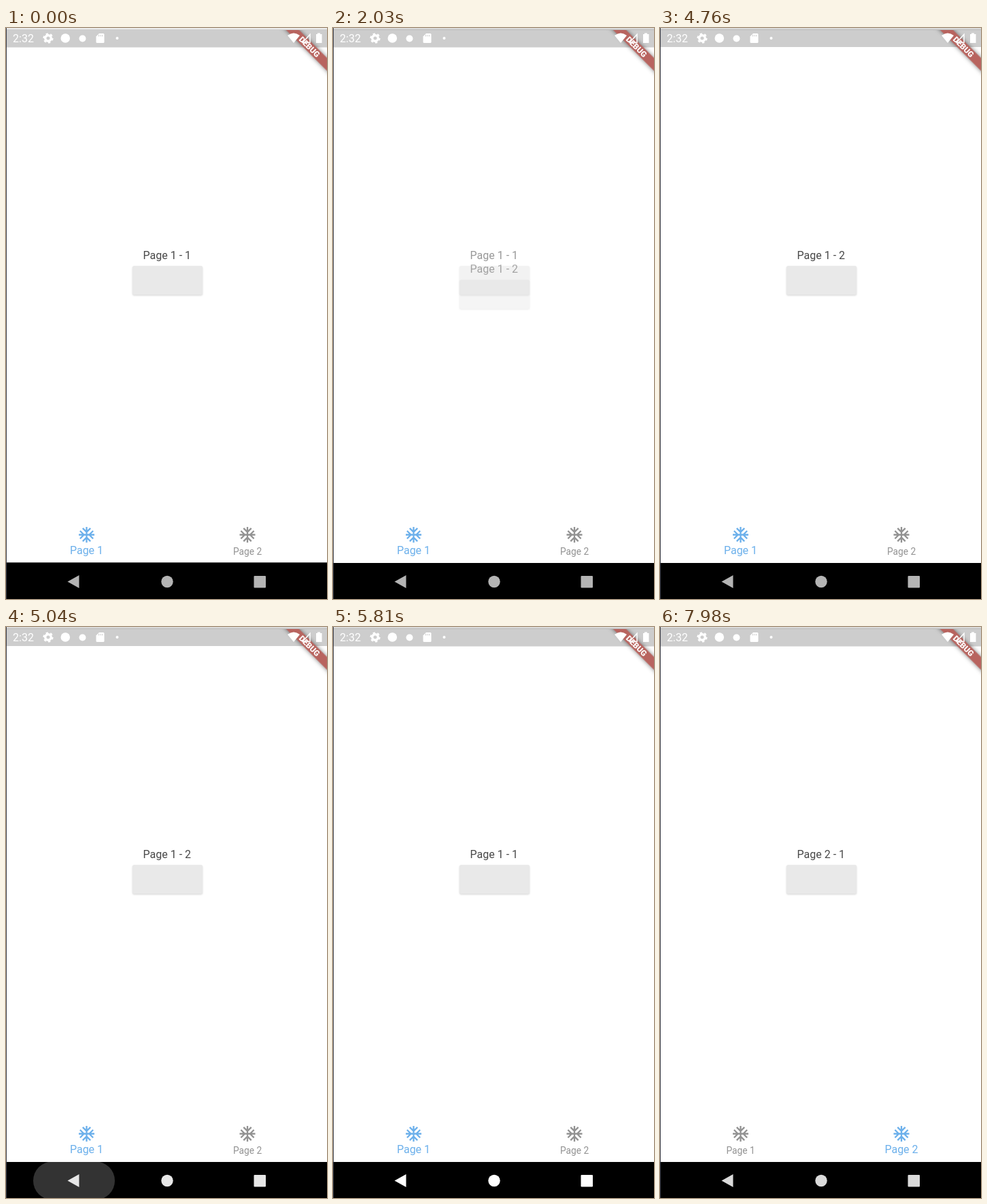
Recreate the animation shown at these times as an HTML page. Size 472 by 840 pixels, loop 8000 ms.

```html
<!DOCTYPE html>
<html>
<head>
<meta charset="utf-8">
<style>
  html, body { margin: 0; width: 100%; height: 100%; overflow: hidden; background: #fff; }
  svg { display: block; width: 472px; height: 840px; font-family: Roboto, Arial, sans-serif; }
  text { text-anchor: middle; }
  .button { fill: #e9e9e9; filter: drop-shadow(0 1.5px 1px rgba(0, 0, 0, .17)); }
  .title { font-size: 16px; fill: #484848; }
</style>
</head>
<body>
<svg viewBox="0 0 472 840">
  <defs>
    <clipPath id="body"><rect y="28" width="472" height="696"/></clipPath>
    <clipPath id="app"><rect y="3" width="472" height="784"/></clipPath>
    <clipPath id="nav"><rect x="1" y="787" width="471" height="53"/></clipPath>
    <g id="arm"><path d="M0-10V0M-4.95-8.35 0-3.4 4.95-8.35"/></g>
    <g id="flake" fill="none" stroke-width="2">
      <use href="#arm"/><use href="#arm" transform="rotate(90)"/>
      <use href="#arm" transform="rotate(180)"/><use href="#arm" transform="rotate(270)"/>
    </g>
  </defs>

  <rect width="472" height="840" fill="#fff"/>
  <rect id="topEdge" width="472" height="2"/>
  <rect y="2" width="472" height="26.5" fill="#cdcdcd"/>
  <rect id="topLine" y="2" width="472" height="1" fill="#b9b9b9"/>

  <g clip-path="url(#body)">
    <text id="title" class="title" x="236.8" y="340"></text>
    <rect class="button" x="186" y="350" width="103" height="42.5" rx="2.5"/>
    <g id="upper">
      <rect y="28" width="472" height="800" fill="#fff"/>
      <text class="title" x="236.8" y="340">Page 1 - 2</text>
      <rect class="button" x="186" y="350" width="103" height="42.5" rx="2.5"/>
    </g>
  </g>

  <g class="tab">
    <use href="#flake" transform="translate(118.5 745.5) scale(1.15)"/>
    <text x="118.5">Page 1</text>
  </g>
  <g class="tab">
    <use href="#flake" transform="translate(355 745.5) scale(1.15)"/>
    <text x="355">Page 2</text>
  </g>

  <g clip-path="url(#app)">
    <g transform="translate(446.3 27.8) rotate(45)">
      <rect x="-70" y="-6.7" width="140" height="13.4" fill="#b8645f"
            style="filter: drop-shadow(0 0 3px rgba(0, 0, 0, .5))"/>
      <text y="4.2" font-size="11.7" font-weight="900" fill="#fff">DEBUG</text>
    </g>
  </g>

  <g fill="#fff">
    <text x="25.5" y="21" font-size="16">2:32</text>
    <g fill="none" stroke="#fff" transform="translate(62 15)">
      <circle r="4.3" stroke-width="3.4"/>
      <circle r="6.3" stroke-width="2.6" pathLength="12" stroke-dasharray="1"/>
    </g>
    <circle cx="87.3" cy="15" r="6.8"/>
    <circle cx="112.5" cy="15.5" r="5"/>
    <path d="M137 8h6q1.5 0 1.5 1.5v11q0 1.5-1.5 1.5h-9q-1.5 0-1.5-1.5v-8z"/>
    <path d="M136.5 10v2.5m2.5-2.5v2.5m2.5-2.5v2.5" stroke="#cdcdcd"/>
    <circle cx="163.5" cy="15" r="2"/>
    <path d="M423 22 414 11Q423 4 432 11Z"/>
    <path d="M447 9.5V21.5H436Z" fill="none" stroke="#fff" stroke-width="1.5"/>
    <path d="M456 9h2V7.5h4V9h2.5V22H456z"/>
  </g>

  <rect id="bar" width="472" height="54"/>
  <g clip-path="url(#nav)">
    <rect id="ripple" x="-61" y="-28" width="122" height="56" rx="28" fill="#fff"/>
  </g>
  <g id="keys">
    <path d="M90.5 814.5 107.5 805V824Z"/>
    <circle cx="237" cy="814.5" r="8.7"/>
    <rect x="364.5" y="806" width="17.5" height="17.5" rx="1"/>
  </g>
  <rect width="1" height="840" fill="#3a3d48"/>
</svg>

<script>
const LOOP = 8000, STEP = 70;
const $ = id => document.getElementById(id);
const tabs = document.querySelectorAll('.tab');
const set = (el, attrs) => { for (const k in attrs) el.setAttribute(k, attrs[k]); };
const span = (t, from, length) => Math.min(1, Math.max(0, (t - from) / length));
const mix = (a, b, p) => a + (b - a) * p;
const blend = (a, b, p) => `rgb(${a.map((v, i) => Math.round(mix(v, b[i], p)))})`;

function bezier(x1, y1, x2, y2) {
  const at = (a, b, s) => 3 * a * s * (1 - s) ** 2 + 3 * b * s * s * (1 - s) + s ** 3;
  return x => {
    let lo = 0, hi = 1;
    for (let i = 0; i < 20; i++) {
      const mid = (lo + hi) / 2;
      if (at(x1, x2, mid) < x) lo = mid; else hi = mid;
    }
    return at(y1, y2, lo);
  };
}
const easeIn = bezier(.42, 0, 1, 1);
const fastOutSlowIn = bezier(.4, 0, .2, 1);

function drawTab(tab, active) {
  const color = blend([146, 146, 146], [108, 176, 235], active);
  set(tab, { fill: color, stroke: 'none' });
  set(tab.firstElementChild, { stroke: color });
  set(tab.lastElementChild, { y: mix(774.7, 774, active), 'font-size': mix(13.76, 16, active) });
}

function draw(t) {
  set($('topEdge'), { fill: t < 1050 ? '#ececec' : '#dadada' });
  set($('topLine'), { opacity: t < 1050 ? 0 : 1 });
  set($('bar'), { y: t < STEP ? 786.3 : 787 });

  // The second page rises and fades in, then leaves the same way.
  const shown = t < 4000 ? span(t, 1890, 230) : 1 - span(t, 5040, 300);
  set($('upper'), {
    opacity: easeIn(shown),
    transform: `translate(0 ${mix(174, 0, fastOutSlowIn(shown))})`
  });
  $('title').textContent = t < 7630 ? 'Page 1 - 1' : 'Page 2 - 1';

  const tab = fastOutSlowIn(span(t, 7590, 200));
  drawTab(tabs[0], 1 - tab);
  drawTab(tabs[1], tab);

  const grow = 1 - (1 - span(t, 4870, 250)) ** 3;
  set($('ripple'), {
    transform: `translate(100 814.5) scale(${mix(.5, 1, grow)} 1)`,
    opacity: t < 4900 ? 0 : .2 * (1 - span(t, 5110, 280))
  });
  const light = span(t, 4870, 250) - span(t, 7810, 340);
  const level = Math.round(mix(180, 255, light));
  set($('keys'), { fill: `rgb(${level},${level},${level})` });
}

function frame() {
  draw(Math.floor(performance.now() % LOOP / STEP) * STEP);
  requestAnimationFrame(frame);
}
frame();
</script>
</body>
</html>
```
